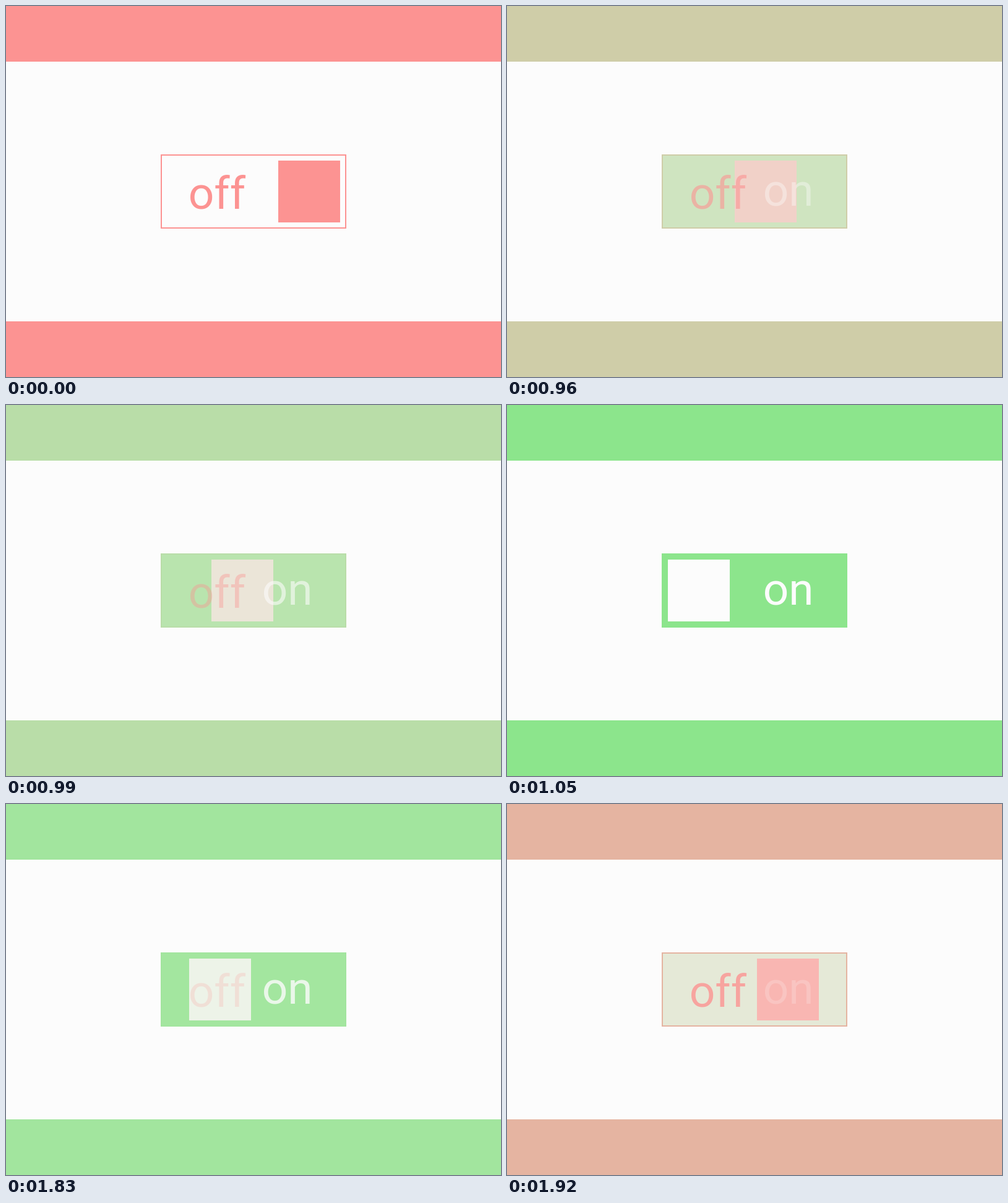
Animation of 800 by 600 pixels, one loop 1.95 s. Source, as an HTML page:

```html
<!DOCTYPE html>
<html lang="en">
<head>
<meta charset="utf-8">
<title>Toggle switch</title>
<style>
  html, body { margin: 0; width: 100%; height: 100%; overflow: hidden; background: #fcfcfc; }
  svg { display: block; width: 800px; height: 600px; }
  text { font: 73px Roboto, sans-serif; font-variant-ligatures: none; }
  .pink { fill: #fc9392; }
  .green { fill: #8ce58c; }
  .white { fill: #fcfcfc; }
</style>
</head>
<body>
<svg viewBox="0 0 800 600">
  <rect class="pink off" width="800" height="600"/>
  <rect class="green on" width="800" height="600"/>
  <rect class="white" y="90" width="800" height="420"/>

  <rect class="pink off" x="250" y="240" width="300" height="120"/>
  <rect class="white off" x="252" y="242" width="296" height="116"/>
  <rect class="green on" x="250" y="240" width="300" height="120"/>

  <g id="knob">
    <rect class="pink off" y="250" width="100" height="100"/>
    <rect class="white on" y="250" width="100" height="100"/>
  </g>

  <text class="pink off" x="294.7" y="328">off</text>
  <text class="white on" x="413.7" y="323">on</text>
</svg>
<script>
  const LOOP = 1950, STEP = 30, STEPS = 5;
  const knob = document.getElementById('knob');
  const offParts = document.querySelectorAll('.off');
  const onParts = document.querySelectorAll('.on');

  // Linear progress from 0 to 1 in held steps, beginning at `start`
  const ramp = (time, start) =>
    Math.min(STEPS, Math.max(0, Math.floor((time - start) / STEP))) / STEPS;

  function draw() {
    const time = performance.now() % LOOP;
    const on = ramp(time, 900) - ramp(time, 1800);
    offParts.forEach(part => part.style.opacity = 1 - on);
    onParts.forEach(part => part.style.opacity = on);
    knob.setAttribute('transform', `translate(${440 - 180 * on} 0)`);
    requestAnimationFrame(draw);
  }
  draw();
</script>
</body>
</html>
```
